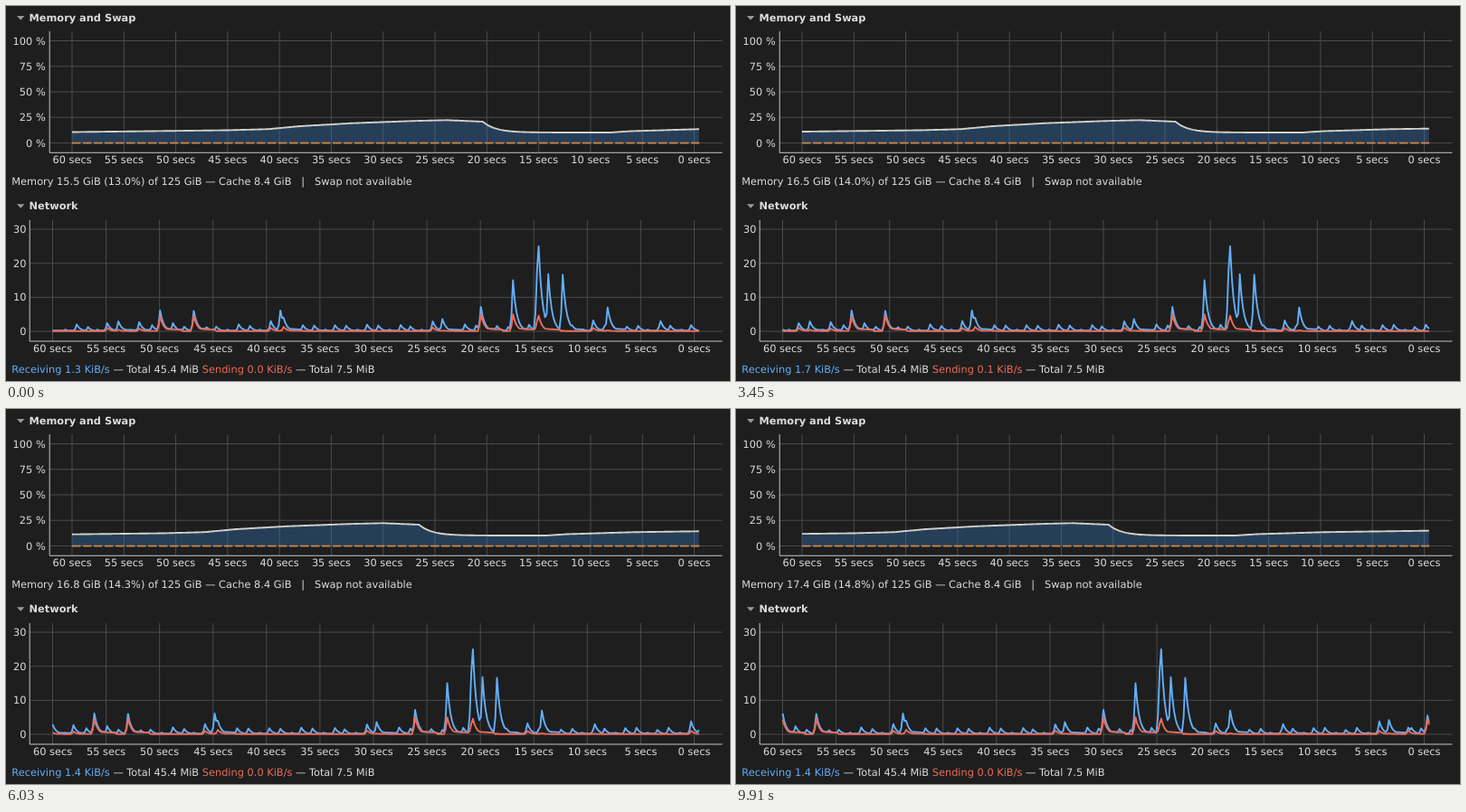
Recreate the animation shown at these times as an HTML page. Size 800 by 415 pixels, loop 10 s.

```html
<!DOCTYPE html>
<html lang="en">
<head>
<meta charset="utf-8">
<style>
html, body { margin: 0; width: 100%; height: 100%; overflow: hidden; background: #1e1e1e; }
svg { display: block; }
text { font: 11.37px "DejaVu Sans", sans-serif; fill: #dcdcdc; white-space: pre; text-rendering: geometricPrecision; }
.title { font-weight: bold; }
.grid { stroke: #4b4b4b; fill: none; }
.axis { stroke: #c4c4c4; fill: none; }
.line { fill: none; stroke-width: 1.9; stroke-linejoin: round; }
</style>
</head>
<body>
<svg id="stage" width="800" height="415" viewBox="0 0 800 415"></svg>
<script>
const LOOP = 10000, SAMPLES = 404, STEPS = 68, TOTAL = SAMPLES + STEPS;
const BLUE = '#62aef8', RED = '#ee6a58', LIGHT = '#dcdcdc';
const stage = document.getElementById('stage');

function add(tag, attrs, parent = stage) {
  const el = document.createElementNS('http://www.w3.org/2000/svg', tag);
  for (const key in attrs) el.setAttribute(key, attrs[key]);
  return parent.appendChild(el);
}
function label(x, y, content, anchor = 'start', cls = '') {
  const el = add('text', { x, y, 'text-anchor': anchor, class: cls });
  el.textContent = content;
  return el;
}

const memY = percent => 151.5 - percent * 1.13;
const netY = rate => 360 - rate * 3.765;

// Title, grid, axes and tick labels of one chart
function chart({ title, titleY, left, top, bottom, x60, labelX, max, step, unit, toY }) {
  add('path', { d: `M12 ${titleY - 6}h8.4l-4.2 4.6z`, fill: '#9a9a9a' });
  label(25.5, titleY, title, 'start', 'title');
  let grid = '';
  for (let v = 0; v <= max; v += step) {
    grid += `M${left} ${toY(v)}H791.5`;
    label(labelX, toY(v) + 4, v + unit, 'end');
  }
  for (let s = 60; s >= 0; s -= 5) {
    const x = 760.5 - (760.5 - x60) * s / 60;
    grid += `M${x} ${top}V${bottom}`;
    label(x, bottom + 12, s + ' secs', 'middle');
  }
  add('path', { class: 'grid', d: grid });
  add('path', { class: 'axis', d: `M${left} ${top}V${bottom}H791.5` });
}

chart({
  title: 'Memory and Swap', titleY: 17, left: 48.2, top: 28, bottom: 162.3,
  x60: 73, labelX: 43.7, max: 100, step: 25, unit: ' %', toY: memY
});
chart({
  title: 'Network', titleY: 225.2, left: 26.2, top: 237, bottom: 371,
  x60: 51.5, labelX: 22.5, max: 30, step: 10, unit: '', toY: netY
});

// Interpolates rows of [key, ...values], optionally in a number of even steps per row
function interpolate(rows, key, steps = 0) {
  let i = 0;
  while (i < rows.length - 2 && rows[i + 1][0] <= key) i++;
  const [a, b] = rows.slice(i, i + 2);
  let f = Math.min(1, (key - a[0]) / (b[0] - a[0]));
  if (steps) f = Math.floor(f * steps) / steps;
  return a.slice(1).map((v, j) => v + (b[j + 1] - v) * f);
}

// Chart positions are x at the start of the loop
const MEM_X = 73, MEM_STEP = 1.719, NET_X = 51.5, NET_STEP = 1.7725;

// Memory grows slowly, is released at DROP, then grows again
const DROP = 527, REGROW = 668;
const before = [[73, 10.6], [245, 12.4], [290, 13.5], [325, 16.4], [383, 19.3], [450, 21.5], [487, 22.3], [DROP, 20.8]];
const after = [[REGROW, 10.2], [690, 11.5], [766, 13.5], [890, 15]];
function memoryAt(x) {
  if (x < DROP) return interpolate(before, x)[0];
  if (x < REGROW) return 10.2 + 10.6 * Math.exp((DROP - x) / 14);
  return interpolate(after, x)[0];
}
const mem = Array.from({ length: TOTAL }, (_, i) => memY(memoryAt(MEM_X + i * MEM_STEP)));

// The large transfers: x, received, sent
const bursts = [
  [112, 2.4, 1], [125, 2.9, .5], [148, 2.7, .8], [171, 6.1, 4.4], [184, 2.4, .5], [207.5, 6, 4.6],
  [292.5, 3, 1], [302.5, 6.1, .2], [307, 4, 1.3], [472, 2.9, 1.1], [483, 3.6, .2], [524, 7.2, 5],
  [560, 15, 5], [586.8, 18, 3], [588.5, 25, 4.6], [599.5, 16.8, .2], [615.5, 16.6, .2], [648, 3.2, 1],
  [664, 7, .3], [722.5, 3, .2], [829, 3.8, 1], [840, 4.2, .3], [862, 2, 1.1], [882.7, 5.5, 4.4]
];
const random = k => Math.abs(Math.sin(k * 12.9898) * 43758.5453) % 1;

// About once a second there is a small transfer; every third one is faint
const ticks = Array.from({ length: 69 }, (_, k) =>
  [66 + 11.92 * k, k % 3 ? 1.2 + .9 * random(k) : .5, .1]);

// A transfer rises at once, decays quickly and leaves a low tail
function traffic(column, floor) {
  const data = Array(TOTAL).fill(floor);
  for (const row of [...ticks, ...bursts]) {
    const at = Math.round((row[0] - NET_X) / NET_STEP), h = row[column];
    const tail = Math.min(1, h * .2);
    for (let k = -1; k < 14 && at + k < TOTAL; k++) {
      const v = k < 0 ? h * .3 : Math.max(h * .64 ** k, tail * .95 ** k);
      data[at + k] = Math.max(data[at + k], v);
    }
  }
  return data.map(netY);
}
const rx = traffic(1, .2), tx = traffic(2, .05);

const area = add('path', { fill: 'rgba(55,120,195,.35)' });
add('path', { class: 'line', d: 'M73 151.6H766', stroke: '#d08748', 'stroke-dasharray': '9.5 2.5' });
const memLine = add('path', { class: 'line', stroke: '#d0d0c8' });
const rxLine = add('path', { class: 'line', stroke: BLUE });
const txLine = add('path', { class: 'line', stroke: RED });

const memText = label(6.3, 198, '');
const netText = label(6.3, 406.2, '');
const [rxText, rxTotal, txText, txTotal] = [BLUE, LIGHT, RED, LIGHT]
  .map(color => add('tspan', { style: 'fill:' + color }, netText));
rxTotal.textContent = ' — Total 45.4 MiB ';
txTotal.textContent = ' — Total 7.5 MiB';

// Time, GiB used, percent used, receiving, sending
const readings = [
  [0, 15.5, 13, 1.3, 0], [2270, 16.4, 13.8, 1.1, 0], [3300, 16.5, 14, 1.7, .1], [5010, 16.7, 14.2, 0, 0],
  [6940, 17, 14.4, 4.3, .1], [8550, 17.3, 14.7, 1.3, .7], [9760, 17.4, 14.8, 1.4, 0]
];

const trace = (data, shift, x, step) =>
  'M' + data.slice(shift, shift + SAMPLES).map((y, i) => `${(x + i * step).toFixed(2)} ${y.toFixed(2)}`).join('L');

function draw(t) {
  const shift = Math.floor((t - 30) / 149.5 + .14) + 1;
  const memPath = trace(mem, shift, MEM_X, MEM_STEP);
  memLine.setAttribute('d', memPath);
  area.setAttribute('d', memPath + 'V151.5H73z');
  rxLine.setAttribute('d', trace(rx, shift, NET_X, NET_STEP));
  txLine.setAttribute('d', trace(tx, shift, NET_X, NET_STEP));

  const [used, percent, down, up] = interpolate(readings, t, 3).map(v => v.toFixed(1));
  memText.textContent = `Memory ${used} GiB (${percent}%) of 125 GiB — Cache 8.4 GiB   |   Swap not available`;
  rxText.textContent = `Receiving ${down} KiB/s`;
  txText.textContent = `Sending ${up} KiB/s`;
}

const start = performance.now();
function tick() {
  draw((performance.now() - start) % LOOP);
  requestAnimationFrame(tick);
}
tick();
</script>
</body>
</html>
```
